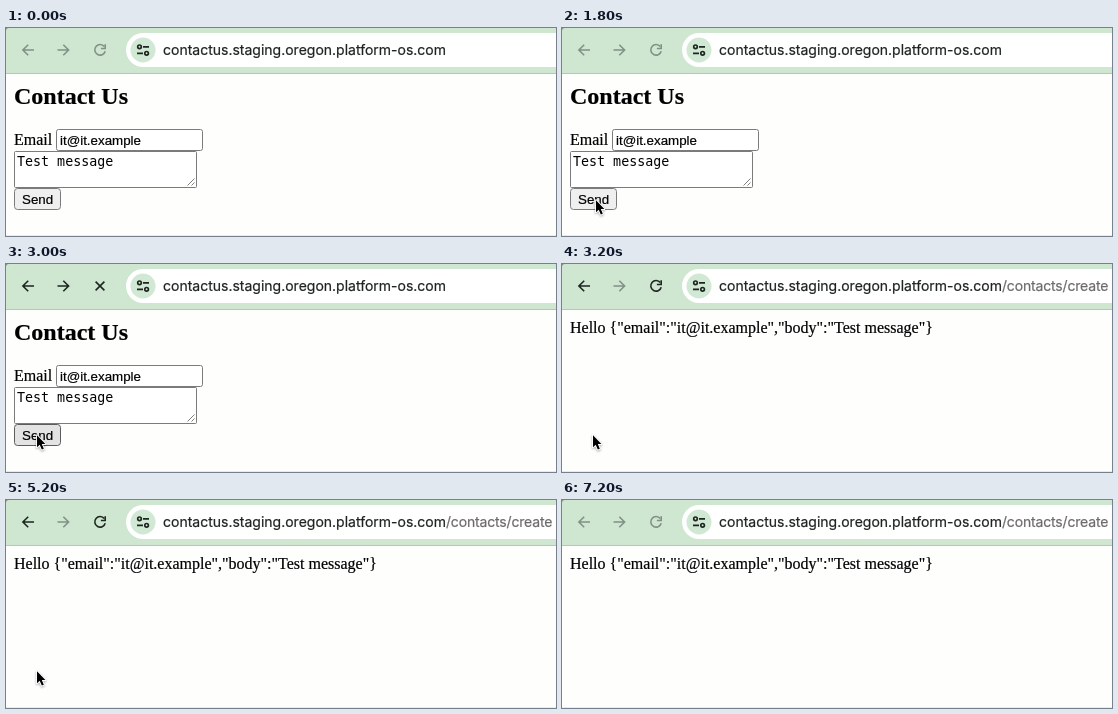
An HTML page for the animation above (8000 ms loop, 550 px wide and 208 px high).

```html
<!DOCTYPE html>
<html lang="en">
<head>
<meta charset="utf-8">
<title>Contact form</title>
<style>
  html, body { margin: 0; width: 100%; height: 100%; overflow: hidden; background: #fefefd; }
  svg { display: block; width: 550px; height: 208px; }
  text { white-space: pre; fill: #000; stroke: #000; stroke-width: .2; }
  .url { font: 14px Inter, sans-serif; fill: #1f2421; stroke: #1f2421; }
  .url .path { fill: #6f6b6b; stroke: #6f6b6b; letter-spacing: -.17px; }
  .serif { font: 16px "Liberation Serif", serif; }
  .title { font: bold 24px "Liberation Serif", serif; }
  .sans { font: 13.333px "Liberation Sans", sans-serif; }
  .mono { font: 13.333px "DejaVu Sans Mono", monospace; stroke: none; }
  .box { fill: #fff; stroke: #7b7b7b; }
  .icon { fill: none; stroke: #819186; stroke-width: 1.6; }
  .icon.on { stroke: #1d2620; }
  .tune { fill: none; stroke: #1d2620; stroke-width: 1.7; }
</style>
</head>
<body>
<svg viewBox="0 0 550 208">
  <rect width="550" height="208" fill="#fefefd"/>
  <rect width="550" height="45" fill="#cfe7d1"/>
  <path d="M0 0H3Q0 0 0 3Z" fill="#7d887f"/>
  <rect y="45" width="550" height="1" fill="#b5c8b7"/>
  <rect y="207" width="550" height="1" fill="#e9ebe9"/>

  <path id="back" class="icon" d="M28 22H17M22.2 16.7L16.9 22l5.3 5.3"/>
  <path id="forward" class="icon" d="M51.5 22H62.5M57.3 16.7L62.6 22l-5.3 5.3"/>
  <g id="reload" class="icon">
    <path d="M98.3 18.6A5.3 5.3 0 1 0 99.2 23.2"/>
    <path d="M99.2 16.2V20.5H94.9"/>
  </g>
  <path id="stop" class="icon on" d="M89.6 17.6l8.8 8.8M98.4 17.6l-8.8 8.8"/>

  <rect x="120" y="5" width="460" height="34" rx="17" fill="#fff"/>
  <circle cx="137" cy="22" r="12.5" fill="#d1e9d4"/>
  <g class="tune">
    <circle cx="133.5" cy="18.8" r="1.8"/>
    <path d="M137 18.8h6M131 25.3h6"/>
    <circle cx="140.6" cy="25.3" r="1.8"/>
  </g>
  <text class="url" x="157" y="27">contactus.staging.oregon.platform-os.com<tspan id="path" class="path">/contacts/create</tspan></text>

  <g id="form">
    <text class="title" x="8" y="76">Contact Us</text>
    <text class="serif" x="8" y="117">Email</text>
    <rect class="box" x="50.5" y="101.5" width="146" height="21" rx="2"/>
    <text class="sans" x="54" y="117">it@it.example</text>
    <rect class="box" x="8.5" y="123.5" width="182" height="36" rx="1"/>
    <text class="mono" x="11" y="138">Test message</text>
    <path d="M181.5 157.5l7-7M185.5 157.5l3-3" stroke="#808080" fill="none"/>
    <rect id="button" class="box" x="8.5" y="160.5" width="46" height="21" rx="3"/>
    <text class="sans" x="16" y="175.5">Send</text>
  </g>

  <text id="result" class="serif" x="8" y="69">Hello {"email":"it@it.example","body":"Test message"}</text>

  <g id="cursor" stroke-linejoin="round">
    <path id="arrow" d="M1 1.2V13.2L3.7 10.8L5.8 15.6L7.8 14.7L5.8 10H9.4Z" stroke="#fff" stroke-width="1.8" paint-order="stroke" style="filter: drop-shadow(0 1px 1px #0005)"/>
  </g>
</svg>
<script>
  const LOOP = 8000;
  const el = id => document.getElementById(id);
  const show = (id, on) => { el(id).style.display = on ? "" : "none"; };

  // Each step keeps the values of the previous one unless it changes them.
  const steps = [
    { at: 0, cursor: null, active: false, pressed: false, loading: false, sent: false },
    { at: 1600, cursor: [38, 180] },
    { at: 1800, cursor: [33, 171] },
    { at: 2000, cursor: [31, 172] },
    { at: 2600, cursor: [30, 170] },
    { at: 2800, active: true, pressed: true },
    { at: 3000, loading: true },
    { at: 3200, loading: false, sent: true },
    { at: 7000, cursor: [31, 177] },
    { at: 7200, cursor: null, active: false }
  ];

  const stateAt = t => Object.assign({}, ...steps.filter(s => s.at <= t));

  function draw(s) {
    el("back").classList.toggle("on", s.active);
    el("forward").classList.toggle("on", s.active && !s.sent);
    el("reload").classList.toggle("on", s.active);
    show("reload", !s.loading);
    show("stop", s.loading);
    show("form", !s.sent);
    show("result", s.sent);
    show("path", s.sent);
    el("button").style.fill = s.pressed ? "#e3e3e3" : "#efefef";
    el("button").style.stroke = s.pressed ? "#5c5c5c" : "#7b7b7b";
    show("cursor", s.cursor);
    if (s.cursor) el("cursor").setAttribute("transform", `translate(${s.cursor})`);
  }

  function tick() {
    draw(stateAt(performance.now() % LOOP));
    requestAnimationFrame(tick);
  }
  tick();
</script>
</body>
</html>
```
